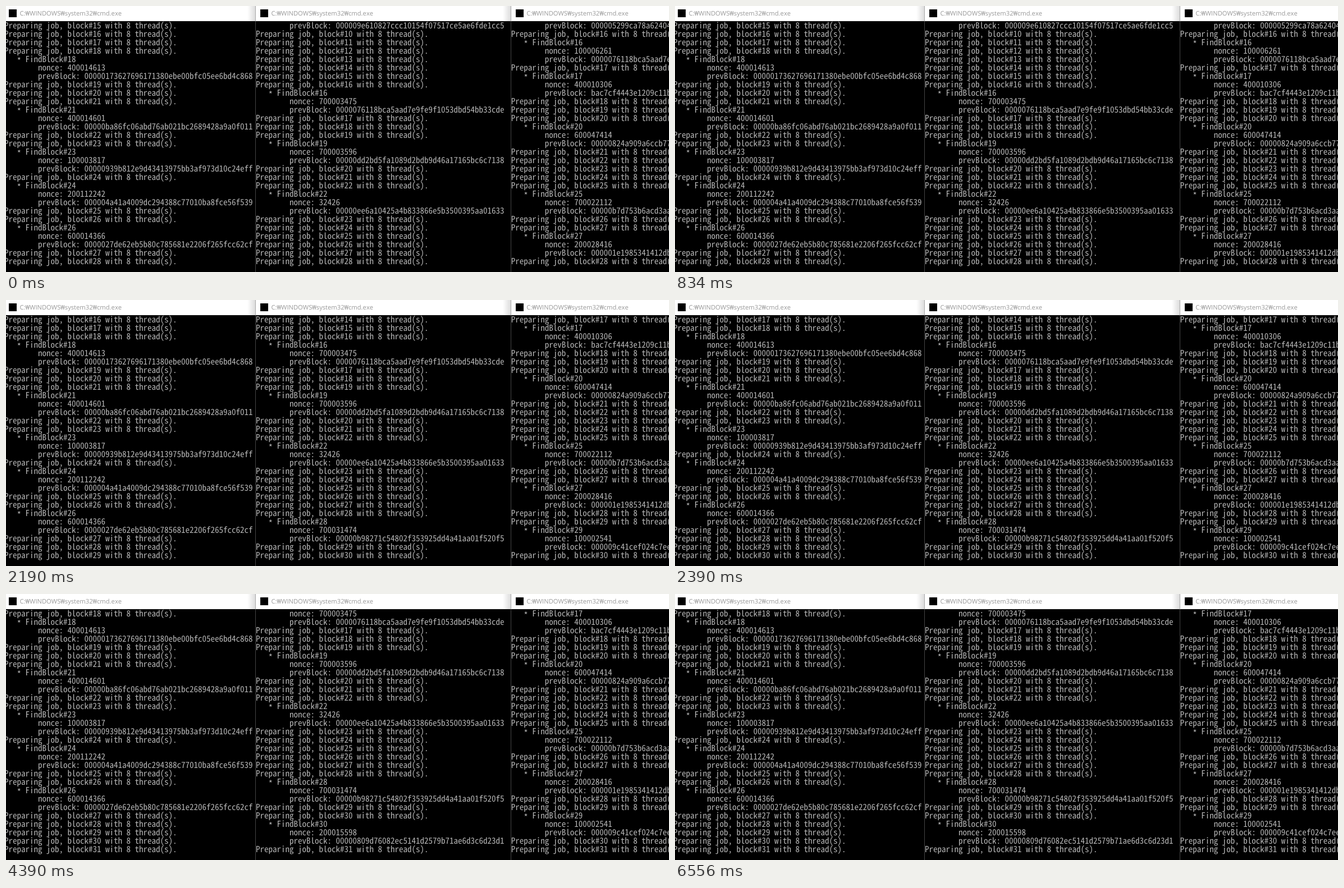
Write an HTML page that moves like this. It is 1181 px wide and 474 px high and loops after 8000 ms.

```html
<!DOCTYPE html>
<html lang="en">
<head>
<meta charset="utf-8">
<title>Three consoles</title>
<style>
  html, body { margin: 0; width: 100%; height: 100%; overflow: hidden; background: #000; }
  svg { display: block; }
  text { white-space: pre; text-rendering: geometricPrecision; font-kerning: none; font-variant-ligatures: none; }
  .log { fill: #b6b6b6; font-family: 'Noto Sans Mono CJK KR', 'Noto Sans Mono CJK JP', 'Liberation Mono', monospace; }
  .title { fill: #999; font-family: 'Open Sans', 'Noto Sans', sans-serif; }
</style>
</head>
<body>
<svg id="stage" width="1181" height="474" viewBox="0 0 1181 474">
  <linearGradient id="shade">
    <stop offset="0" stop-color="#000" stop-opacity="0"/>
    <stop offset="1" stop-color="#000" stop-opacity=".14"/>
  </linearGradient>
</svg>
<script>
const LOOP = 8000, ROWS = 29, ROW_H = 15, CHAR_W = 7.5, BAR_H = 27, SHADE_W = 14;
const TITLE = 'C:₩WINDOWS₩system32₩cmd.exe', TITLE_W = 181;
const LAST_BLOCK = 31;

// finds: block number -> [nonce, hash]; steps: [time in ms, newest block]
const panels = [
  {
    left: -3, x: 0, width: 444, first: 15,
    steps: [[0, 28], [1390, 29], [2390, 30], [4390, 31]],
    finds: {
      18: ['400014613', '00000173627696171380ebe00bfc05ee6bd4c868'],
      21: ['400014601', '00000ba86fc06abd76ab021bc2689428a9a0f011'],
      23: ['100003817', '00000939b812e9d43413975bb3af973d10c24eff'],
      24: ['200112242', '000004a41a4009dc294388c77010ba8fce56f539'],
      26: ['600014366', '0000027de62eb5b80c785681e2206f265fcc62cf']
    }
  },
  {
    left: 445, x: 445, width: 454, first: 9,
    steps: [[0, 28], [1390, 29], [2190, 30], [4390, 31]],
    finds: {
      9: ['', '000009e610827ccc10154f07517ce5ae6fde1cc5'],
      16: ['700003475', '0000076118bca5aad7e9fe9f1053dbd54bb33cde'],
      19: ['700003596', '00000dd2bd5fa1089d2bdb9d46a17165bc6c7138'],
      22: ['32426', '00000ee6a10425a4b833866e5b3500395aa01633'],
      28: ['700031474', '00000b98271c54802f353925dd4a41aa01f520f5'],
      30: ['200015598', '00000809d76082ec5141d2579b71ae6d3c6d23d1']
    }
  },
  {
    left: 899.7, x: 900, width: 281, first: 15,
    steps: [[0, 28], [1390, 29], [2190, 30], [4390, 31]],
    finds: {
      15: ['', '000005299ca78a62404'],
      16: ['100006261', '0000076118bca5aad7e9fe9f1053dbd54bb33cde'],
      17: ['400010306', 'bac7cf4443e1209c11b'],
      20: ['600047414', '00000824a909a6ccb77'],
      25: ['700022112', '00000b7d753b6acd3aa'],
      27: ['200028416', '000001e1985341412db'],
      29: ['100002541', '000009c41cef024c7ee']
    }
  }
];

const stage = document.getElementById('stage');

function add(parent, tag, attrs, text) {
  const el = document.createElementNS('http://www.w3.org/2000/svg', tag);
  for (const key in attrs) el.setAttribute(key, attrs[key]);
  if (text) el.textContent = text;
  parent.appendChild(el);
  return el;
}

// Font size at which a sample of the given class has the wanted advance.
function sizeFor(cls, sample, width) {
  const probe = add(stage, 'text', { class: cls });
  const ctx = document.createElement('canvas').getContext('2d');
  ctx.font = '100px ' + getComputedStyle(probe).fontFamily;
  probe.remove();
  return 100 * width / ctx.measureText(sample).width;
}

function buildLog(panel) {
  const lines = [], ends = {};
  for (let n = panel.first; n <= LAST_BLOCK; n++) {
    lines.push(`Preparing job, block#${n} with 8 thread(s).`);
    ends[n] = lines.length;
    const find = panel.finds[n];
    if (find) lines.push(`   * FindBlock#${n}`, `        nonce: ${find[0]}`, `        prevBlock: ${find[1]}`);
  }
  return { lines, ends };
}

const logSize = sizeFor('log', '0'.repeat(40), CHAR_W * 40);
const titleSize = sizeFor('title', TITLE, TITLE_W);

function buildPanel(panel, i) {
  const { left, x, width } = panel;
  const clip = add(stage, 'clipPath', { id: 'clip' + i });
  add(clip, 'rect', { x, y: 0, width, height: 474 });
  const g = add(stage, 'g', { 'clip-path': `url(#clip${i})` });
  add(g, 'rect', { x, y: 0, width, height: 474, fill: '#000' });
  add(g, 'rect', { x, y: 0, width, height: BAR_H, fill: '#fff' });
  add(g, 'rect', { x: Math.round(left) + 8, y: 6, width: 14, height: 14, fill: '#000' });
  add(g, 'text', { class: 'title', x: left + 27.5, y: 17, 'font-size': titleSize }, TITLE);
  panel.rows = Array.from({ length: ROWS }, (_, r) =>
    add(g, 'text', { class: 'log', x: left, y: 40 + r * ROW_H, 'font-size': logSize }));
  panel.log = buildLog(panel);
  if (i) {
    // The window on the right shades its neighbour's title bar.
    add(stage, 'rect', { x: x - 1 - SHADE_W, y: 0, width: SHADE_W, height: BAR_H, fill: 'url(#shade)' });
    add(stage, 'rect', { x: x - 1, y: 0, width: 1, height: BAR_H, fill: '#aaa' });
    add(stage, 'rect', { x: x - 1, y: BAR_H, width: 1, height: 474 - BAR_H, fill: '#444' });
  }
}

// Writes a line, with any bullet lowered to the middle of the row.
function write(row, line) {
  const [head, tail] = line.split('*');
  row.textContent = head;
  if (tail === undefined) return;
  add(row, 'tspan', { dy: 3 }, '*');
  add(row, 'tspan', { dy: -3 }, tail);
}

function show(panel, t) {
  const block = panel.steps.filter(step => step[0] <= t).pop()[1];
  if (block === panel.shown) return;
  panel.shown = block;
  const top = panel.log.ends[block] - ROWS;
  panel.rows.forEach((row, r) => write(row, panel.log.lines[top + r]));
}

panels.forEach(buildPanel);

const start = performance.now();
function tick() {
  const t = (performance.now() - start) % LOOP;
  panels.forEach(panel => show(panel, t));
  requestAnimationFrame(tick);
}
tick();
</script>
</body>
</html>
```
